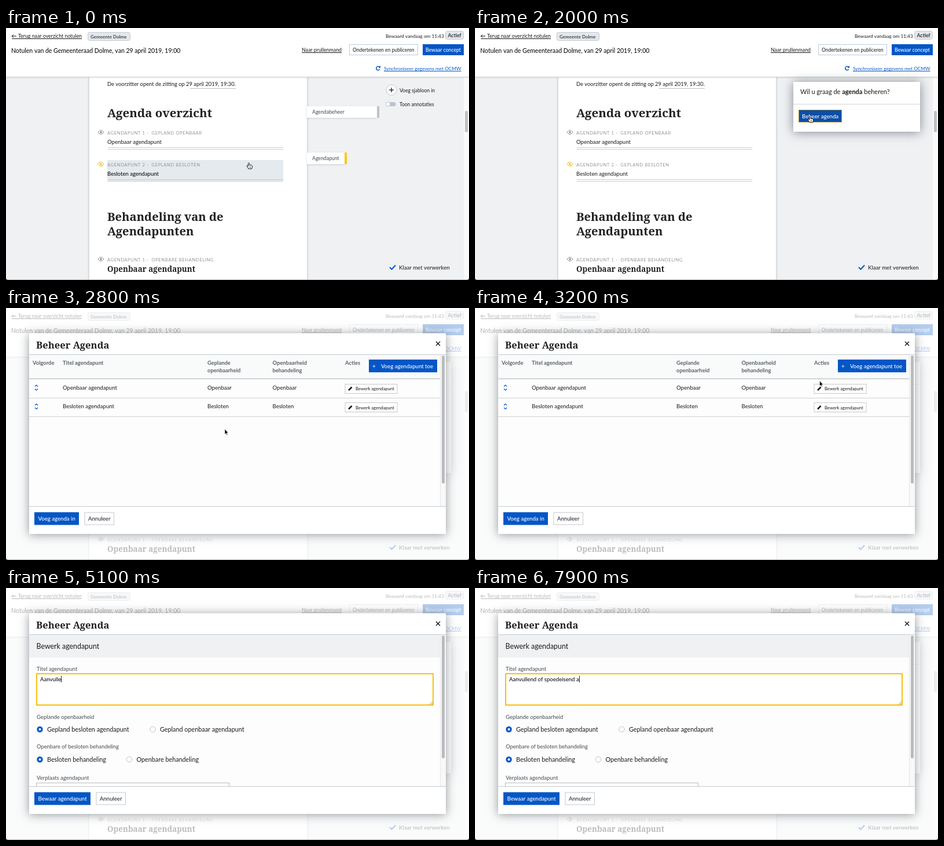
Recreate the animation shown at these times as an HTML page with a canvas. Size 800 px wide and 435 px high, loop 8000 ms.

```html
<!DOCTYPE html>
<html lang="nl">
<head>
<meta charset="utf-8">
<title>Beheer Agenda</title>
<style>
  html, body { margin: 0; width: 100%; height: 100%; overflow: hidden; background: #fff; }
  canvas { display: block; width: 800px; height: 435px; }
</style>
</head>
<body>
<canvas id="stage" width="800" height="435"></canvas>
<script>
const ctx = document.getElementById('stage').getContext('2d');
const LOOP = 8000, STEP = 100;
const BLUE = '#0456c6', YELLOW = '#f9c013', INK = '#1a1a1a', PAGE = '#eff1f3';
const SANS = 'Lato, "Open Sans", sans-serif', SERIF = '"Noto Serif", serif';

const clamp = v => Math.max(0, Math.min(1, v));
const progress = (t, from, to) => clamp((t - from) / (to - from));

function rect(x, y, w, h, fill, border, lineWidth = 1) {
  if (fill) { ctx.fillStyle = fill; ctx.fillRect(x, y, w, h); }
  if (border) {
    const o = lineWidth / 2;
    ctx.strokeStyle = border;
    ctx.lineWidth = lineWidth;
    ctx.strokeRect(x + o, y + o, w - lineWidth, h - lineWidth);
  }
}

function pill(x, y, w, h, r, fill, border) {
  ctx.beginPath();
  ctx.roundRect(x, y, w, h, r);
  if (fill) { ctx.fillStyle = fill; ctx.fill(); }
  if (border) { ctx.strokeStyle = border; ctx.lineWidth = 1; ctx.stroke(); }
}

function path(points, color, width, fill) {
  ctx.beginPath();
  points.forEach(([x, y], i) => i ? ctx.lineTo(x, y) : ctx.moveTo(x, y));
  if (fill) { ctx.closePath(); ctx.fillStyle = fill; ctx.fill(); }
  if (color) { ctx.strokeStyle = color; ctx.lineWidth = width; ctx.stroke(); }
}

function disc(x, y, r, fill, border, width = 1) {
  ctx.beginPath();
  ctx.arc(x, y, r, 0, 7);
  if (fill) { ctx.fillStyle = fill; ctx.fill(); }
  if (border) { ctx.strokeStyle = border; ctx.lineWidth = width; ctx.stroke(); }
}

// Draws text on its baseline and returns the x where it ends.
function text(str, x, y, size = 9.6, { color = INK, weight = 400, family = SANS, spacing = 0, underline } = {}) {
  ctx.font = `${weight} ${size}px ${family}`;
  ctx.letterSpacing = spacing + 'px';
  ctx.fillStyle = color;
  ctx.fillText(str, x, y);
  const end = x + ctx.measureText(str).width;
  ctx.letterSpacing = '0px';
  if (underline) rect(x, Math.round(y + 1), end - x, 1, color);
  return end;
}

const heading = (str, x, y, size) => text(str, x, y, size, { weight: 700, family: SERIF, color: '#222' });
const label = (str, x, y) => text(str, x, y, 7.6, { color: '#92979c', spacing: 0.6 });
const primary = { color: '#fff', weight: 500 };

function shadowed(blur, alpha, draw) {
  ctx.save();
  ctx.shadowColor = `rgba(40,50,60,${alpha})`;
  ctx.shadowBlur = blur;
  ctx.shadowOffsetY = 1;
  draw();
  ctx.restore();
}

function eye(x, y, color, crossed) {
  ctx.beginPath();
  ctx.moveTo(x - 5, y);
  ctx.quadraticCurveTo(x, y - 7, x + 5, y);
  ctx.quadraticCurveTo(x, y + 7, x - 5, y);
  ctx.strokeStyle = color;
  ctx.lineWidth = 1;
  ctx.stroke();
  disc(x, y, 1.8, color);
  if (crossed) {
    path([[x - 3, y - 4.5], [x + 5, y + 3.5]], '#fff', 1);
    path([[x - 4, y - 4.5], [x + 4, y + 4]], color, 1);
  }
}

function drawHeader() {
  shadowed(3, 0.25, () => rect(0, 0, 800, 84, '#fff'));
  rect(0, 84, 800, 1, '#d0d4d8');
  path([[18, 14], [10, 14]], INK, 1);
  path([[13, 11.5], [10, 14], [13, 16.5]], INK, 1);
  rect(10, 18, 11, 1, INK);
  text('Terug naar overzicht notulen', 21, 17, 8.8, { underline: true });
  pill(141.5, 7.5, 73, 14, 3, '#e4e7eb', '#c4cad1');
  text('Gemeente Dolme', 146, 17.5, 8, { weight: 700, color: '#444b52' });
  text('Notulen van de Gemeenteraad Dolme, van 29 april 2019, 19:00', 9, 43, 10.5, { color: '#000' });
  text('Bewaard vandaag om 11:43', 656, 16.5, 8.25);
  pill(759.5, 5.5, 31, 14, 3, '#e4e7eb', '#c4cad1');
  text('Actief', 763.5, 16, 8.6, { weight: 700, color: '#333a40' });
  text('Naar prullenmand', 511, 41, 8.8, { underline: true });
  rect(593, 28, 119, 19, '#fff', '#bccbdc');
  text('Ondertekenen en publiceren', 599, 41, 8.5);
  rect(720, 28, 71, 19, BLUE);
  text('Bewaar concept', 725, 41, 8.6, primary);
  ctx.beginPath();
  ctx.arc(643, 69.5, 3.2, 0.5, 5.5);
  ctx.strokeStyle = BLUE;
  ctx.lineWidth = 1.4;
  ctx.stroke();
  path([[647, 65], [647, 69], [643.5, 68.5]], null, 0, BLUE);
  text('Synchroniseer gegevens met OCMW', 653, 73, 8.25, { color: BLUE, underline: true });
}

function drawDocument(t) {
  const selected = t < 1700;
  rect(0, 84, 800, 351, PAGE);
  shadowed(4, 0.3, () => rect(144, 80, 376, 360, '#fff'));
  text('De voorzitter opent de zitting op 29 april 2019, 19:30.', 175, 100, 9.35);
  rect(318, 104, 79, 1, '#b9bec4');
  heading('Agenda overzicht', 175, 154, 20.5);

  eye(164, 180, '#888d92');
  label('AGENDAPUNT 1 -  GEPLAND OPENBAAR', 175, 184);
  text('Openbaar agendapunt', 175, 199.5);
  if (selected) rect(175, 228, 304, 37, '#e4eaee');
  eye(164, 235, '#f0bd1c', true);
  const end = label('AGENDAPUNT 2 -  GEPLAND BESLOTEN', 175, 239);
  if (selected && t >= 900 && t < 1500) rect(end, 231, 1, 10, '#777');
  text('Besloten agendapunt', 175, 254.5, 9.6, { color: selected ? '#000' : INK });
  for (const y of [206, 209, 261, 264]) rect(176, y, 303, 1, '#c6cdd3');

  heading('Behandeling van de', 175, 333, 20.2);
  heading('Agendapunten', 175, 357.5, 20.2);
  eye(164, 399, '#888d92');
  label('AGENDAPUNT 1 -  OPENBARE BEHANDELING', 175, 403);
  heading('Openbaar agendapunt', 175, 420.5, 13.45);
}

function hintCard(name, y, w, bar) {
  shadowed(3, 0.18, () => rect(520, y, w, 20, '#fff'));
  rect(520 + w, y, 4, 20, bar);
  text(name, 529, y + 13, 8.7, { color: '#444b52' });
}

function drawSidebar(t) {
  if (t < 1700) {
    hintCard('Agendabeheer', 135, 121, '#bac4cf');
    hintCard('Agendapunt', 215, 65, '#fbc81b');
  }
  disc(666, 107, 9, '#fafbfc', '#c3cad1');
  path([[662, 107], [670, 107]], INK, 1.3);
  path([[666, 103], [666, 111]], INK, 1.3);
  text('Voeg sjabloon in', 680, 110.5, 8.5);
  pill(656.5, 128, 17, 7, 3.5, '#b9c3ce');
  disc(660, 131.5, 3.8, '#fff', '#b9c3ce');
  text('Toon annotaties', 680, 135, 8.5);
  path([[663, 413], [666.5, 416.5], [673, 409.5]], BLUE, 2);
  text('Klaar met verwerken', 679, 416.5, 9.65);
  rect(791, 85, 9, 350, '#fafafa');
  pill(793, 143, 5, 37, 2.5, '#bfc1c3');
}

function drawPopup(t) {
  const shown = progress(t, 400, 700);
  if (!shown) return;
  const pressed = t >= 1900;
  const height = t < 2600 ? 86 : t < 3500 ? 192 : 227;
  ctx.save();
  ctx.globalAlpha = shown;
  shadowed(17, 0.55, () => rect(550, 93, 219, height, '#fff'));
  let x = text('Wil u graag de ', 562, 114, 11);
  x = text('agenda', x, 114, 11, { weight: 700 });
  text(' beheren?', x, 114, 11);
  rect(550, 131, 219, 1, '#d2d6da');
  rect(559, 141, 75, 22, pressed ? '#0b4ea6' : BLUE, pressed ? '#b59c3c' : null);
  text('Beheer agenda', 565, 156, 9.6, primary);
  ctx.restore();
}

function button(str, x, w, main) {
  rect(x, 352.5, w, 22, main ? BLUE : '#fff', main ? null : '#c3c8ce');
  text(str, x + 6.5, 367, 9.6, main ? primary : {});
}

function drawTable() {
  const head = { weight: 700, color: '#5b636b' };
  rect(40, 81, 711, 41, '#f9fafa');
  text('Volgorde', 46, 98, 9.4, head);
  text('Titel agendapunt', 98, 98, 9.4, head);
  text('Geplande', 348, 98, 9.4, head);
  text('openbaarheid', 348, 110.5, 9.4, head);
  text('Openbaarheid', 460.5, 98, 9.4, head);
  text('behandeling', 460.5, 110.5, 9.4, head);
  text('Acties', 586, 98, 9.4, head);
  rect(627, 89, 118, 22, BLUE);
  text('+', 633, 104, 10, primary);
  text('Voeg agendapunt toe', 648, 103.5, 9.6, primary);
  rect(40, 121.5, 711, 1.5, '#c3c8cd');
  ['Openbaar', 'Besloten'].forEach((kind, i) => {
    const y = 137 + i * 32.5;
    path([[50, y - 1.5], [52.5, y - 4], [55, y - 1.5]], BLUE, 1.2);
    path([[50, y + 2.5], [52.5, y + 5], [55, y + 2.5]], BLUE, 1.2);
    text(kind + ' agendapunt', 98, y + 3.5);
    text(kind, 348, y + 3.5);
    text(kind, 460.5, y + 3.5);
    rect(585.5, Math.round(y - 6.2), 91, 17, '#fff', '#c3c8ce');
    path([[592, y + 5], [597.5, y - 0.5]], INK, 2.6);
    text('Bewerk agendapunt', 604, y + 5.2, 7.6);
    rect(40, Math.round(y + 17.5), 711, 1, '#cdd1d5');
  });
  button('Voeg agenda in', 49, 77, true);
  button('Annuleer', 135.5, 51.5);
}

function radio(str, x, y, on) {
  if (on) { disc(x, y, 5.2, BLUE); disc(x, y, 2, '#fff'); }
  else disc(x, y, 4.8, '#fff', '#bcc2c8');
  text(str, x + 12.5, y + 4, 10.8);
}

const TYPED = 'Aanvullend of spoedeisend a';
const TYPING = [[4300, 0], [4600, 5], [4700, 5], [5600, 11], [6200, 13], [6600, 17], [7500, 24], [7900, 27]];

// Interpolates keys of the form [time, ...values].
function along(keys, t) {
  const i = keys.findIndex(k => k[0] > t);
  if (i < 0) return keys[keys.length - 1].slice(1);
  if (i === 0) return keys[0].slice(1);
  const a = keys[i - 1], b = keys[i], p = (t - a[0]) / (b[0] - a[0]);
  return a.slice(1).map((v, n) => v + (b[n + 1] - v) * p);
}

function drawForm(t) {
  const small = { color: '#444b52' };
  const focused = t >= 4200;
  rect(40, 81, 711, 39, PAGE);
  text('Bewerk agendapunt', 52.5, 105, 12.4);
  text('Titel agendapunt', 53, 143, 9.5, small);
  rect(52, 147, 687, 56, '#fff', focused ? YELLOW : null, 2);
  if (!focused) rect(52, 147, 686, 56, null, '#b5babf');
  path([[732, 201], [737, 196]], '#777', 0.8);
  path([[735, 201], [737, 199]], '#777', 0.8);
  if (focused) {
    const count = Math.round(along(TYPING, t)[0]);
    const end = text(TYPED.slice(0, count), 59, 160.5, 9.6, { color: '#000' });
    rect(Math.round(end), 151.5, 1, 11.5, '#222');
  }
  text('Geplande openbaarheid', 53, 225.5, 9.5, small);
  radio('Gepland besloten agendapunt', 58.5, 244, true);
  radio('Gepland openbaar agendapunt', 253.5, 244);
  text('Openbare of besloten behandeling', 53, 277, 9.4, small);
  radio('Besloten behandeling', 58.5, 296, true);
  radio('Openbare behandeling', 213, 296);
  text('Verplaats agendapunt', 53, 330.5, 9.5, small);
  rect(52, 336, 334, 24, '#fff', '#b5babf');
  text('Selecteer een optie', 58, 348.5, 9.5, small);
  rect(40, 343, 720, 47, '#fff');
  button('Bewaar agendapunt', 49, 97, true);
  button('Annuleer', 155.5, 51.5);
}

function drawModal(t) {
  const shown = progress(t, 2200, 2600);
  if (!shown) return;
  const editing = t >= 3500;
  ctx.save();
  ctx.globalAlpha = shown;
  rect(0, 0, 800, 435, 'rgba(255,255,255,0.7)');
  shadowed(16, 0.5, () => rect(40, 43.5, 720, 346.5, '#fff'));
  rect(40, 81, 720, 262, '#fdfdfd');
  heading('Beheer Agenda', 52, 70, 16.6);
  path([[743, 58], [750, 65]], INK, 1.5);
  path([[750, 58], [743, 65]], INK, 1.5);
  editing ? drawForm(t) : drawTable();
  rect(40, 80, 720, 1, '#c6cbd0');
  rect(40, 342, 720, 1, '#c6cbd0');
  rect(751, 81, 9, 261, '#f8f8f8');
  rect(750, 81, 1, 261, '#e6e6e6');
  pill(753, 82, 5, editing ? 212 : 221, 2.5, '#b9bbbd');
  ctx.restore();
}

const POINTER = [
  [1100, 421, 238], [1500, 480, 210], [1900, 580, 158], [2300, 580, 158], [2700, 378, 214],
  [2900, 378, 214], [3300, 668, 103], [3600, 668, 103], [4100, 303, 185]
];

function hand(x, y) {
  ctx.beginPath();
  ctx.moveTo(x - 2, y + 5);
  ctx.lineTo(x - 5, y);
  ctx.quadraticCurveTo(x - 4, y - 2, x - 2, y + 0.5);
  ctx.lineTo(x - 2.5, y - 4.5);
  ctx.quadraticCurveTo(x - 1.4, y - 6.3, x - 0.4, y - 4.5);
  ctx.lineTo(x, y - 1.2);
  ctx.quadraticCurveTo(x + 4, y - 2, x + 4.5, y);
  ctx.quadraticCurveTo(x + 5, y + 3, x + 3.5, y + 5);
  ctx.closePath();
  ctx.fillStyle = '#fff';
  ctx.fill();
  ctx.strokeStyle = '#111';
  ctx.lineWidth = 1;
  ctx.stroke();
  for (const dx of [0, 1.8]) path([[x + dx, y + 1], [x + dx, y + 3.5]], '#222', 0.7);
}

function arrow(x, y) {
  path([[0, -5], [0, 4], [2, 2.3], [3.4, 5.3], [4.8, 4.7], [3.4, 1.8], [6, 1.6]]
    .map(([dx, dy]) => [x + dx, y + dy]), '#fff', 0.6, '#000');
}

function beam(x, y) {
  path([[x, y - 4], [x, y + 4]], '#111', 1.1);
  for (const s of [-1, 1]) path([[x - 2.5, y + s * 5], [x, y + s * 4], [x + 2.5, y + s * 5]], '#111', 1);
}

function drawPointer(t) {
  if (t >= 4800) return;
  const [x, y] = along(POINTER, t);
  const overButton = t >= 3300 && t < 3600;
  if (t < 1200 || (t >= 1800 && t < 2400) || overButton) hand(x, y);
  else if (t >= 3900) beam(x, y);
  else arrow(x, y);
}

function drawCorners() {
  rect(0, 434, 800, 1, '#b4b6b8');
  for (const [x, s] of [[0, 1], [800, -1]]) {
    ctx.beginPath();
    ctx.moveTo(x, 431);
    ctx.quadraticCurveTo(x, 435, x + s * 4, 435);
    ctx.lineTo(x, 435);
    ctx.fillStyle = '#111';
    ctx.fill();
  }
}

function render(now) {
  const t = Math.floor((now % LOOP) / STEP) * STEP;
  rect(0, 0, 800, 435, '#fff');
  drawDocument(t);
  drawSidebar(t);
  drawHeader();
  drawPopup(t);
  drawModal(t);
  drawPointer(t);
  drawCorners();
}

let start;
function tick(now) {
  start ??= now;
  render(Math.max(0, now - start));
  requestAnimationFrame(tick);
}
render(0);
requestAnimationFrame(tick);
</script>
</body>
</html>
```
